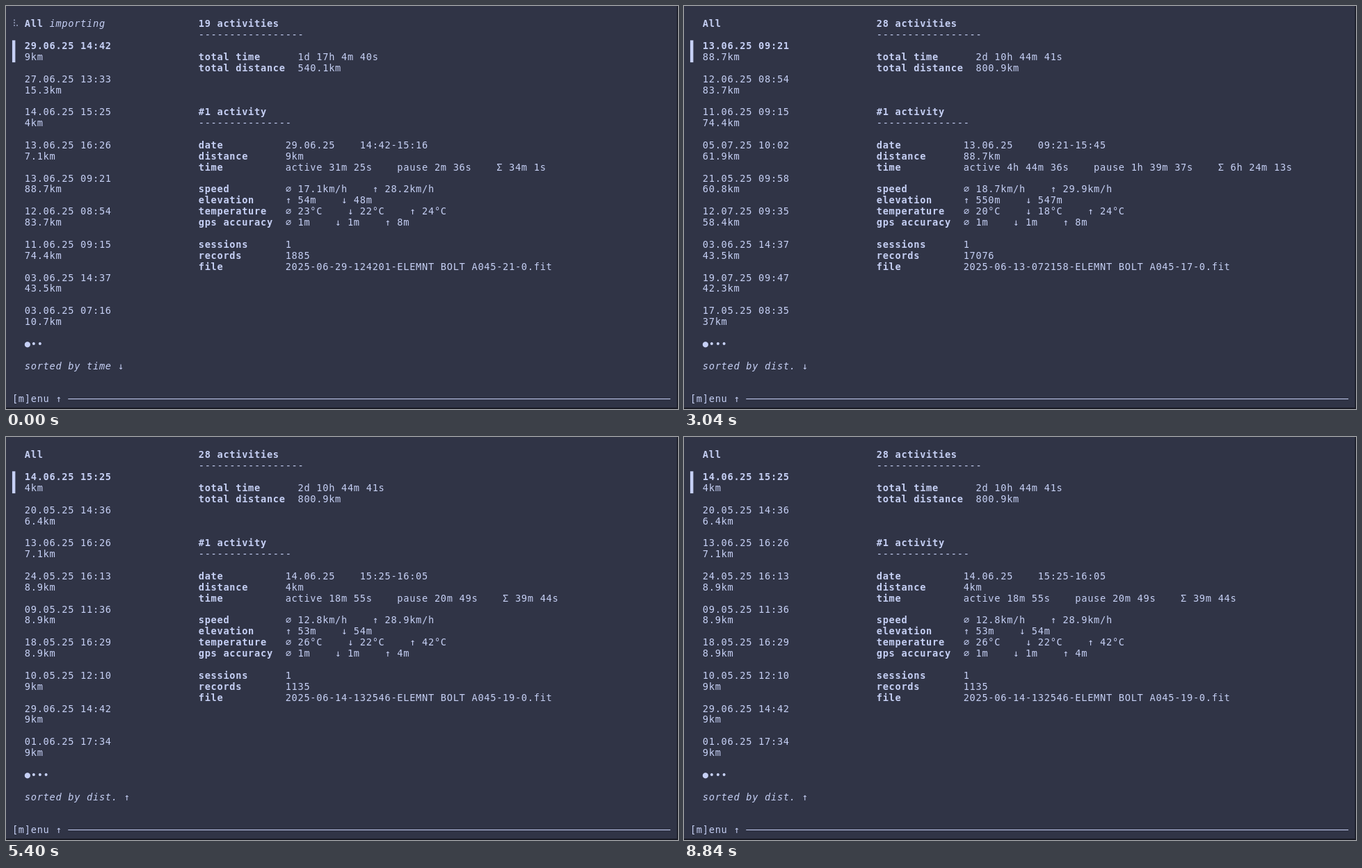
These frames come from a looping animation (966x580 px, 8.92 s). An HTML page with a canvas:

```html
<!DOCTYPE html>
<html lang="en">
<head>
<meta charset="utf-8">
<title>Activity list</title>
<style>
  html, body { margin: 0; width: 100%; height: 100%; overflow: hidden; background: #303446; }
  canvas { display: block; }
</style>
</head>
<body>
<canvas id="stage" width="966" height="580"></canvas>
<script>
const ctx = document.getElementById('stage').getContext('2d');
const LOOP = 8920, TICK = 40;
const CELL_W = 8.926, CELL_H = 15.88, TOP = 1.7, ASCENT = 12.7;
const BG = '#303446', FG = '#c6d0f5', DIM = '#838ba7', EDGE = '#191a24';
const SPINNER = '⠋⠙⠹⠸⠼⠴⠦⠧⠇⠏';

// Rides in order of time: day, start, km
const rides = `08.05 16:50 24.8|09.05 11:36 8.88|10.05 12:10 8.96|17.05 08:35 37
18.05 16:29 8.9|19.05 12:43 30|20.05 14:36 6.4|21.05 09:58 60.8|24.05 16:13 8.86
01.06 17:34 9.03|03.06 07:16 10.7|03.06 14:37 43.5|11.06 09:15 74.4|12.06 08:54 83.7
13.06 09:21 88.7|13.06 16:26 7.1|14.06 15:25 4|27.06 13:33 15.3|29.06 14:42 9
02.07 17:20 12.6|05.07 10:02 61.9|06.07 10:14 18.3|09.07 17:41 14.2|12.07 09:35 58.4
13.07 14:08 22.7|16.07 18:02 11.8|19.07 09:47 42.3|20.07 15:21 18.6`
  .split(/[|\n]/).map((line, time) => {
    const [day, start, km] = line.split(' ');
    return { time, day: day + '.25', start, km: +km };
  });

// Recorded details: end, active, pause, total, speed, elevation, temperature, gps, records, seconds
const recorded = {
  '08.05.25 16:50': '18:12|1h 15m 55s|6m 44s|1h 22m 39s|19.5 41.4|185 182|14 12 21|2 1 7|4555|20',
  '20.05.25 14:36': '15:00|24m 7s|2|24m 9s|16.3 24.6|28 22|22 21 25|1 1 11|1447|46',
  '03.06.25 07:16': '07:55|34m 25s|4m 39s|39m 4s|18.7 27.4|85 82|11 10 21|1 0 16|2065|25',
  '14.06.25 15:25': '16:05|18m 55s|20m 49s|39m 44s|12.8 28.9|53 54|26 22 42|1 1 4|1135|46',
  '27.06.25 13:33': '14:23|48m 21s|2m 7s|50m 28s|18.9 29.3|110 114|16 14 24|1 0 53|2901|30',
  '29.06.25 14:42': '15:16|31m 25s|2m 36s|34m 1s|17.1 28.2|54 48|23 22 24|1 1 8|1885|01',
};

const pad = n => String(n).padStart(2, '0');
const distance = km => +km.toFixed(1) + 'km';
const duration = s => [[s / 86400, 'd'], [s / 3600 % 24, 'h'], [s / 60 % 60, 'm'], [s % 60, 's']]
  .map(([n, unit]) => [Math.floor(n), unit]).filter(([n]) => n).map(p => p.join('')).join(' ');

function details(ride) {
  const known = recorded[`${ride.day} ${ride.start}`];
  if (known) return known.split('|');
  const { km, time } = ride, speed = 17 + km % 3;
  const active = Math.round(km / speed * 3600);
  const pause = Math.round(active * (km > 50 ? .35 : .08));
  const [h, m] = ride.start.split(':').map(Number);
  const end = h * 60 + m + Math.round((active + pause) / 60);
  const climb = Math.round(km * 6.2), warm = 15 + time % 9;
  return [`${pad(Math.floor(end / 60))}:${pad(end % 60)}`,
    duration(active), duration(pause), duration(active + pause),
    `${speed.toFixed(1)} ${(speed * 1.6).toFixed(1)}`, `${climb} ${climb - 3}`,
    `${warm} ${warm - 2} ${warm + 4}`, `1 1 ${4 + time % 5}`, active, pad(time * 17 % 60)];
}

function fileName({ day, start, time }, seconds) {
  const [d, m] = day.split('.'), [hour, minute] = start.split(':');
  return `2025-${m}-${d}-${pad(hour - 2)}${minute}${seconds}-ELEMNT BOLT A045-${time + (time < 9 ? 2 : 3)}-0.fit`;
}

const sorting = [[0, 'time ↓'], [1960, 'time ↑'], [2520, 'time ↓'], [3040, 'dist. ↓'], [3440, 'dist. ↑']];
const steps = (start, gap, count, value) =>
  Array.from({ length: count }, (_, k) => [start + gap * k, value(k + 1)]);
const selection = [[0, 0],
  ...steps(3920, 75.5, 10, k => k),
  ...steps(4840, 80, 8, k => Math.round(10 - k * 1.25)),
  ...steps(6920, 80, 6, k => 3 + k),
  [7480, 7], [7600, 5], [7680, 4], [7760, 3], [7880, 2], [7960, 1], [8080, 0]];
const valueAt = (events, t) => events.findLast(e => e[0] <= t)[1];

function put(col, row, text, style = '', color = FG) {
  ctx.font = `${style} 13.65px "DejaVu Sans Mono", monospace`;
  ctx.fillStyle = color;
  [...text].forEach((ch, i) => ctx.fillText(ch, (col + i) * CELL_W, TOP + row * CELL_H + ASCENT));
}

function block(col, row, cols, rows) {
  ctx.fillStyle = FG;
  ctx.fillRect(col * CELL_W, TOP + row * CELL_H, cols * CELL_W, rows * CELL_H);
}

function drawTitle(t, filtered) {
  if (t >= 5760 && t < 6920) {
    const input = filtered ? '/06.' : '/';
    put(3, 1, input);
    if (t < 6400) block(3 + input.length, 1, 1, 1);
  } else if (filtered) {
    put(3, 1, '10 of 28', 'italic');
  } else {
    put(3, 1, 'All', 'bold');
    if (t < 1480) {
      put(7, 1, 'importing', 'italic');
      put(1, 1, SPINNER[(7 + Math.floor(t / 83)) % 10], '', DIM);
    }
  }
}

function drawList(list, selected, perPage, filtered, base, order) {
  const page = Math.floor(selected / perPage);
  list.slice(page * perPage, (page + 1) * perPage).forEach((ride, i) => {
    const row = 3 + 3 * i, active = i === selected % perPage;
    const date = `${ride.day} ${ride.start}`;
    if (active) block(1, row, .5, 2);
    if (filtered && !active) {
      put(3, row, date.slice(0, 3));
      put(6, row, date.slice(3, 6), 'bold');
      put(9, row, date.slice(6));
    } else put(3, row, date, active ? 'bold' : '');
    put(3, row + 1, distance(ride.km));
  });
  const pages = Math.ceil(list.length / perPage);
  put(3, base, Array.from({ length: pages }, (_, i) => i === page ? '●' : '•').join(''));
  const label = 'sorted by ' + order.slice(0, -2);
  put(3, base + 2, label, 'italic');
  put(4 + label.length, base + 2, order.slice(-1));
}

function drawDetails(list, selected, filtered) {
  const newKm = list.filter(r => r.time > 18).reduce((sum, r) => sum + r.km, 0);
  const km = filtered ? 345.5 : 540.1 + newKm;
  const seconds = filtered ? 99185 : 147880 + Math.round(63601 * newKm / 260.8);
  put(31, 1, `${list.length} activities`, 'bold');
  put(31, 2, '-'.repeat(17));
  put(31, 4, 'total time', 'bold');
  put(47, 4, duration(seconds));
  put(31, 5, 'total distance', 'bold');
  put(47, 5, distance(km));

  const ride = list[selected];
  const [end, active, pause, total, speed, climb, temp, gps, records, sec] = details(ride);
  const marked = (values, marks, unit) =>
    values.split(' ').map((v, i) => `${marks[i]} ${v}${unit}`).join('    ');
  put(31, 9, `#${selected + 1} activity`, 'bold');
  put(31, 10, '-'.repeat(15));
  [
    [12, 'date', `${ride.day}    ${ride.start}-${end}`],
    [13, 'distance', distance(ride.km)],
    [14, 'time', `active ${active}    pause ${pause}    Σ ${total}`],
    [16, 'speed', marked(speed, '⌀↑', 'km/h')],
    [17, 'elevation', marked(climb, '↑↓', 'm')],
    [18, 'temperature', marked(temp, '⌀↓↑', '°C')],
    [19, 'gps accuracy', marked(gps, '⌀↓↑', 'm')],
    [21, 'sessions', '1'],
    [22, 'records', String(records)],
    [23, 'file', fileName(ride, sec)],
  ].forEach(([row, label, value]) => {
    put(31, row, label, 'bold');
    put(45, row, value);
  });
}

function drawMenu(open, row) {
  put(1, row, `[m]enu ${open ? '↓' : '↑'}`);
  ctx.fillStyle = FG;
  ctx.fillRect(10 * CELL_W, Math.round(TOP + (row + .5) * CELL_H), 97 * CELL_W, 1);
  if (!open) return;
  [
    ['actions', '[r]eload  [q]uit'],
    ['list', '[↑]up     [↓]down      [g]first  [G]last  [←/→]switch pages'],
    ['sort', '[^t]ime   [^d]uration'],
    ['filter', '[/]start  [ESC]clear'],
  ].forEach(([label, keys], i) => {
    put(1, row + 1 + i, label, 'bold');
    put(13, row + 1 + i, keys);
  });
}

function draw(now) {
  const t = Math.floor(now % LOOP / TICK) * TICK;
  const menuOpen = t >= 5640 && t < 8200;
  const filtered = t >= 5880 && t < 8840;
  const base = menuOpen ? 25 : 30;
  const order = valueAt(sorting, t), selected = valueAt(selection, t);
  const key = order.startsWith('time') ? 'time' : 'km';
  const sign = order.endsWith('↑') ? 1 : -1;
  const list = rides.slice(0, 19 + Math.floor(t / 115))
    .filter(r => !filtered || r.day.includes('06.'))
    .sort((a, b) => sign * (a[key] - b[key]));

  ctx.fillStyle = EDGE;
  ctx.fillRect(0, 0, 966, 580);
  ctx.fillStyle = BG;
  ctx.fillRect(0, 0, 964.5, 578);
  drawTitle(t, filtered);
  drawList(list, selected, menuOpen ? 7 : 9, filtered, base, order);
  drawDetails(list, selected, filtered);
  drawMenu(menuOpen, base + 5);
}

const begin = performance.now();
function frame() {
  draw(performance.now() - begin);
  requestAnimationFrame(frame);
}
frame();
</script>
</body>
</html>
```
